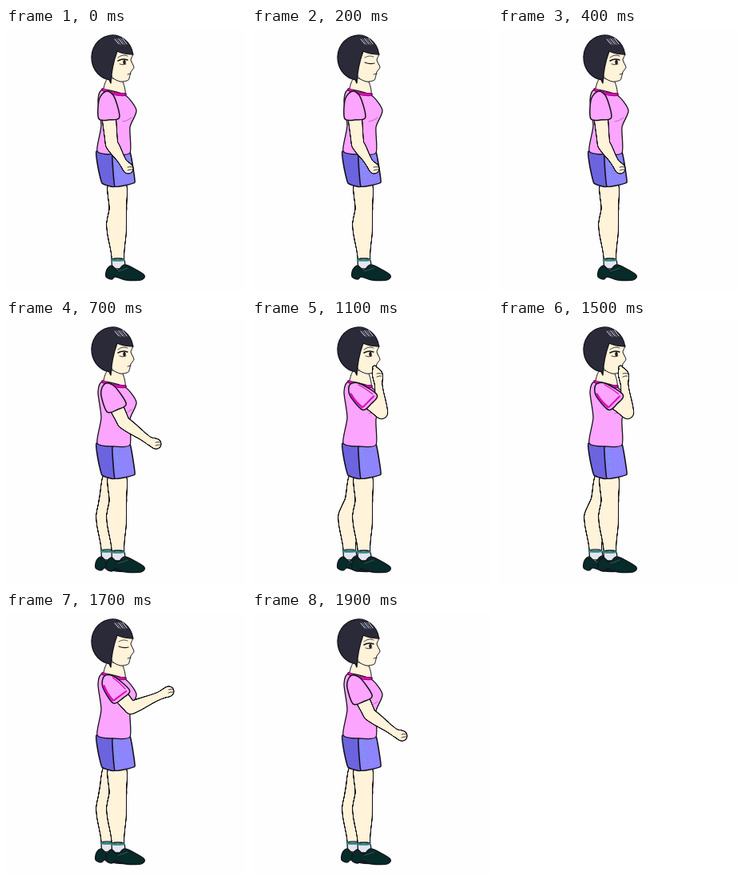
An HTML page with a canvas that plays this animation: 300x330 px, repeating every 2.1 s.

```html
<!DOCTYPE html>
<html lang="en">
<head>
<meta charset="utf-8">
<title>Thinking woman</title>
<style>
html, body { margin: 0; width: 100%; height: 100%; overflow: hidden; background: #fefefe; }
canvas { display: block; width: 300px; height: 330px; }
</style>
</head>
<body>
<canvas id="stage" width="300" height="330"></canvas>
<script>
const ctx = document.getElementById('stage').getContext('2d');
const INK = '#15121a', SKIN = '#fff3da', PINK = '#fca5ff', MAGENTA = '#dc08bd';
const BLUE = '#6c64df', LIGHT_BLUE = '#8e84fb', HAIR = '#2b2a39', SHOE = '#062b29';
const mix = (a, b, k) => a + (b - a) * k;
const point = (x, y) => ({ x, y });
ctx.lineCap = ctx.lineJoin = 'round';

function paint(fill, width = 1.3, color = INK) {
  if (fill) {
    ctx.fillStyle = fill;
    ctx.fill();
  }
  if (width) {
    ctx.lineWidth = width;
    ctx.strokeStyle = color;
    ctx.stroke();
  }
}

// Closed outline through a few points; round sets how far corners soften.
function shape(points, fill, round = 0.12, width) {
  const n = points.length;
  const at = i => points[(i + n) % n];
  ctx.beginPath();
  ctx.moveTo(...at(0));
  points.forEach((b, i) => {
    const a = at(i - 1), c = at(i + 1), d = at(i + 2);
    ctx.bezierCurveTo(
      b[0] + (c[0] - a[0]) * round, b[1] + (c[1] - a[1]) * round,
      c[0] - (d[0] - b[0]) * round, c[1] - (d[1] - b[1]) * round, ...c);
  });
  ctx.closePath();
  paint(fill, width);
}

function curve(x0, y0, bend, x1, y1, width = 1, color = INK) {
  ctx.beginPath();
  ctx.moveTo(x0, y0);
  ctx.quadraticCurveTo((x0 + x1) / 2, (y0 + y1) / 2 + bend, x1, y1);
  paint(null, width, color);
}

// Tapered limb swept by discs between joints, outlined by a wider first pass.
function limb(joints, radii) {
  for (const [grow, color] of [[0.7, INK], [-0.6, SKIN]]) {
    ctx.fillStyle = color;
    for (let i = 0; i < joints.length - 1; i++) {
      const a = joints[i], b = joints[i + 1];
      for (let k = 0; k <= 1; k += 0.02) {
        const ease = (1 - Math.cos(Math.PI * k)) / 2;
        ctx.beginPath();
        ctx.arc(mix(a.x, b.x, k), mix(a.y, b.y, k),
          mix(radii[i], radii[i + 1], ease) + grow, 0, Math.PI * 2);
        ctx.fill();
      }
    }
  }
}

function leg(shift, spread) {
  const x = 139 - shift;
  limb([point(139 - shift / 2, 200), point(x + 1, 226), point(x - 1 - spread, 246), point(x + 1 - spread, 290)],
    [12, 10.5, 12, 7.5]);
  ctx.save();
  ctx.translate(-shift - spread, -shift / 12);
  shape([[133, 289], [147, 289], [148, 300], [134, 300]], '#e4e6ee');
  curve(132, 290, 1, 147, 290, 2.6, TEAL);
  shape([[126, 302], [132, 297], [140, 303], [149, 296], [172, 308], [169, 315], [150, 315], [137, 311], [132, 314], [125, 311]], SHOE, 0.15);
  curve(140, 304, 1, 152, 300, 0.8, '#3d6864');
  ctx.restore();
}
const TEAL = '#2b8582';

function shorts() {
  shape([[113, 154], [134, 158], [136, 198], [120, 194], [115, 174]], BLUE, 0.06, 1.6);
  shape([[133, 158], [155, 155], [161, 193], [136, 198]], LIGHT_BLUE, 0.04, 1.6);
  for (let i = 0; i < 4; i++) {
    curve(137 + i, 162 + i * 7, 0, 138 + i, 165 + i * 7, 1, '#50bfe4');
  }
}

function torso() {
  shape([[127, 63], [122, 78], [135, 83], [149, 82], [145, 66]], SKIN, 0.1, 1);
  shape([[121, 77], [149, 84], [163, 103], [155, 124], [155, 156], [134, 158], [114, 154], [119, 122], [115, 90]], PINK);
  curve(157, 112, 2, 146, 117, 1, '#b56ab9');
  curve(121, 77, 4, 149, 83, 4, '#65124f');
  curve(122, 77, 4, 148, 83, 2.6, MAGENTA);
}

function eye(look) {
  if (look === 'closed') {
    curve(141, 43, 2, 153, 44, 1.2);
    curve(141, 37, -3, 152, 36, 0.7);
    return;
  }
  curve(140, 41, -3, 152, 40, 1.5);
  curve(142, 45, 2, 150, 45, 0.8);
  curve(140, 37, -4, 152, 35, 0.8);
  ctx.beginPath();
  ctx.ellipse(look === 'aside' ? 149.6 : 148, 42.6, 1.8, 2.8, 0, 0, Math.PI * 2);
  paint('#251b20', 0);
}

function head(look) {
  shape([[132, 27], [158, 31], [156, 40], [160, 49], [156, 55], [153, 65], [143, 67], [132, 60]], SKIN, 0.1, 1);
  curve(152, 58, 0, 156, 57, 0.8);
  eye(look);
  ctx.beginPath();
  ctx.ellipse(133, 37, 26, 28, 0, -0.15, Math.PI * 0.55, true);
  ctx.lineTo(131, 69);
  ctx.quadraticCurveTo(132, 48, 139, 29);
  ctx.quadraticCurveTo(147, 33, 159, 33);
  ctx.closePath();
  paint(HAIR);
  for (let i = 0; i < 5; i++) {
    curve(136 + i * 2.4, 14 - i * 0.3, 0, 141 + i * 2.5, 20 + i % 2, 1, i % 2 ? '#85849a' : '#dddde7');
  }
}

const poses = {
  stand: { elbow: point(132, 145), wrist: point(147, 169), hand: point(153, 176) },
  reach: { elbow: point(147, 128), wrist: point(179, 151), hand: point(188, 155) },
  lift: { elbow: point(156, 120), wrist: point(193, 104), hand: point(204, 99) },
  think: { elbow: point(162, 116), wrist: point(158, 80), hand: point(157, 69) }
};

function arm(name) {
  const { elbow, wrist, hand } = poses[name];
  const shoulder = point(126, 84);
  const angle = Math.atan2(elbow.y - shoulder.y, elbow.x - shoulder.x);
  const bent = name === 'lift' || name === 'think';
  const upper = point(shoulder.x + Math.cos(angle) * 22, shoulder.y + Math.sin(angle) * 22);
  const joints = [upper, elbow, wrist, hand], radii = [8.5, 7.5, 4.5, 6];
  if (name === 'think') {
    joints.push(point(153, 59));
    radii.push(2);
  }
  limb(joints, radii);
  for (let i = 0; i < 2; i++) {
    curve(hand.x - 1, hand.y + i * 4 - 2, -1, hand.x + 5, hand.y + i * 3 - 2, 0.8);
  }
  ctx.save();
  ctx.translate(shoulder.x, shoulder.y);
  ctx.rotate(angle);
  shape([[-5, 0], [3, -9], [29, -13], [31, 0], [28, 13], [4, 10]], PINK, 0.15, 1.5);
  if (bent) {
    curve(4, 8, 2, 25, 11, 2.5, MAGENTA);
    curve(26, 10, 0, 27, -9, 2, MAGENTA);
    curve(3, -7, -1, 24, -10, 1.2, MAGENTA);
  }
  ctx.restore();
}

function draw(pose, look) {
  ctx.fillStyle = '#fefefe';
  ctx.fillRect(0, 0, 300, 330);
  if (pose !== 'stand') leg(13, pose === 'think' ? 5 : 0);
  leg(0, 0);
  shorts();
  torso();
  head(look);
  arm(pose);
}

const start = performance.now();
function tick() {
  const beat = Math.floor((performance.now() - start) % 2100 / 100);
  // The gesture rises and falls evenly around its middle beat.
  const away = Math.abs(beat - 13.5);
  const pose = away < 3 ? 'think' : away < 5 ? 'lift' : away < 7 ? 'reach' : 'stand';
  const closed = pose === 'lift' || beat === 2 || beat === 3;
  draw(pose, closed ? 'closed' : away < 1 ? 'aside' : 'open');
  requestAnimationFrame(tick);
}
tick();
</script>
</body>
</html>
```
